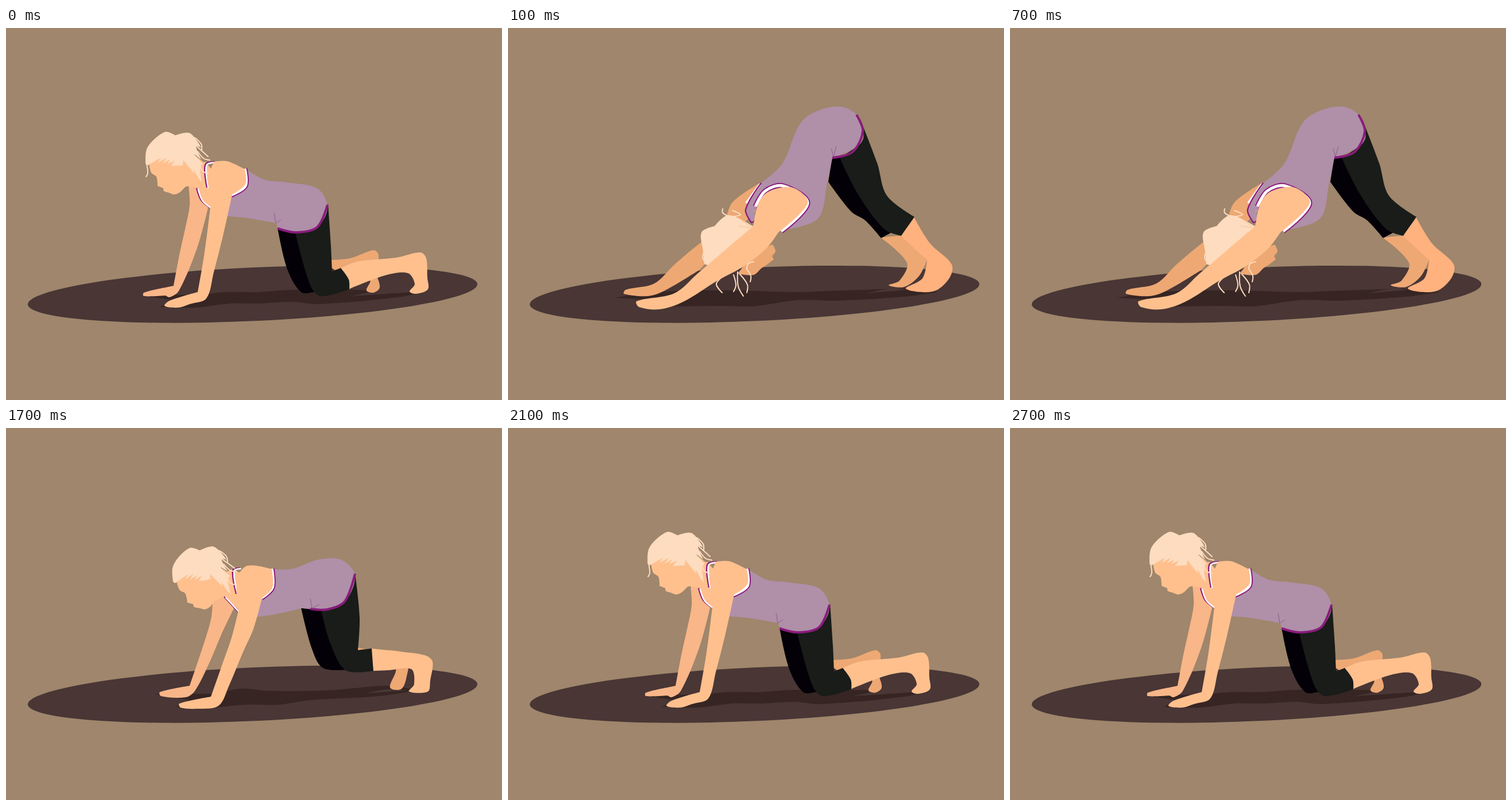
Write an HTML page that moves like this. It is 864 px wide and 648 px high and loops after 3100 ms.

```html
<!DOCTYPE html>
<html lang="en">
<head>
<meta charset="utf-8">
<title>Yoga poses</title>
<style>
  html, body { margin: 0; width: 100%; height: 100%; overflow: hidden; background: #9f866c; }
  svg { display: block; width: 100%; height: 100%; }
  .mat { fill: #493635; }
  .shadow { fill: #362523; }
  .skin { fill: #ffc08e; }
  .shade { fill: #f9b688; }
  .deep { fill: #eea873; }
  .warm { fill: #ffb17e; }
  .hair { fill: #fddcbf; }
  .top { fill: #b08fa9; }
  .near { fill: #191c18; }
  .far { fill: #040007; }
  .line { fill: none; stroke-linejoin: round; }
  .strand { stroke: #fddcbf; stroke-width: 2; stroke-linecap: round; }
  .fringe { stroke: #ffc08e; }
  .crease { stroke: #8a5b88; }
  .hem { stroke: #8a1c7c; stroke-width: 4; }
  .strap { stroke: #8a1c7c; stroke-width: 2.4; }
  .armhole { stroke: #8a1c7c; stroke-width: 9; }
  .white { stroke: #fff; }
  .armhole.white { stroke-width: 5; }
  .strap.white { transform: translate(2.5px, 1px); }

  /* Hard cuts between the poses */
  .pose { visibility: hidden; animation: 3100ms step-end infinite; }
  #kneel { animation-name: kneel; }
  #dog { animation-name: dog; }
  #lift { animation-name: lift; }
  @keyframes kneel {
    0% { visibility: visible; }
    3.2258% { visibility: hidden; }
    67.7419%, 100% { visibility: visible; }
  }
  @keyframes dog {
    0% { visibility: hidden; }
    3.2258% { visibility: visible; }
    35.4839%, 100% { visibility: hidden; }
  }
  @keyframes lift {
    0% { visibility: hidden; }
    35.4839% { visibility: visible; }
    67.7419%, 100% { visibility: hidden; }
  }
</style>
</head>
<body>
<svg viewBox="0 0 864 648">
  <defs>
    <path id="face" class="skin" data-via="248,228! 253,252 262,259 264,275! 274,279! 275,284 284,287 293,290 303,286 312,277! 334,270! 346,235! 320,215!"/>
    <g id="hair">
      <path class="hair" data-via="247,239! 243,236 247,207 277,181 295,187! 320,183 340,208! 331,206 340,229! 328,220 343,237! 338,241 341,269! 332,257 336,263! 327,247 328,254! 309,230! 308,239! 296,240! 288,240! 294,231! 281,237! 286,229! 273,236! 280,226! 264,235! 270,226!"/>
      <path class="line strand" data-via="329,191 340,202 341,212 / 331,205 341,214 352,224 / 334,215 344,227 355,230 / 337,236 342,249 352,253"/>
    </g>
  </defs>

  <ellipse class="mat" rx="392" ry="46.6" transform="translate(429.5 463.8) rotate(-2.6)"/>

  <g id="kneel" class="pose">
    <path class="shadow" data-via="242,467! 350,463! 385,460 440,460 500,456 650,457! 600,467! 708,460 736,457! 690,468 545,481 500,477 440,480 390,480 330,487 268,486! 290,474!"/>
    <path class="deep" data-via="567,404! 600,401 640,387 649,395 645,425 651,452 640,461 628,457 634,440 600,438! 567,418!"/>
    <path class="skin" data-via="578,421! 612,407 680,400 722,391 732,401 734,435 735,455 715,463 703,459 712,446 700,427 660,431 597,455!"/>
    <path class="far" data-via="473,348! 490,420 514,460 537,460 552,455! 515,353!"/>
    <path class="near" data-via="561,306! 566,380 568,424! 583,418! 597,438 598,455! 548,467 530,448 504,357! 543,345"/>
    <path class="shade" data-via="318,275! 333,277! 352,313! 333,383 301,458 285,469 278,466! 240,467 240,461 278,452! 292,449! 302,395 312,350 320,308"/>
    <path class="top" data-via="332,278! 357,314! 372,295! 417,245! 450,264 490,269 543,280 560,313 542,347 505,356 473,349! 471,340! 420,331 385,328! 393,290! 350,250!"/>
    <path class="line hem" data-via="473,349 505,356 542,347 560,308"/>
    <path class="line crease" data-via="467,322 470,340! 479,334"/>
    <use href="#face"/>
    <path class="skin" data-via="318,276! 333,278! 342,302 358,312! 370,260! 347,233! 325,240!"/>
    <path class="line strap" data-via="364,233 347,238 350,278"/>
    <path class="line strap" data-via="332,279 340,300 357,314"/>
    <path class="line armhole" data-via="416,245 417,275 392,291"/>
    <path class="skin" data-via="350,262! 362,233! 385,232 416,246! 417,272 394,290! 378,362 362,425 349,471 320,481 300,487 276,484 285,475 334,460! 346,390 356,312! 355,288!"/>
    <use href="#hair"/>
    <path class="line strand" data-via="244,232 247,252 244,259"/>
  </g>

  <g id="dog" class="pose">
    <path class="shadow" data-via="184,470! 270,459 390,457 500,460 590,457 725,454 748,460! 690,468 575,475 505,474 425,485 378,484 300,485 225,486! 245,473!"/>
    <path class="mat" data-via="625,462! 695,456! 665,454"/>
    <path class="deep" data-via="649,365! 688,361! 730,404! 716,432 690,451 663,448 682,440 695,409"/>
    <path class="warm" data-via="707,329! 735,375 773,412 768,437 740,459 693,454 722,436 730,404! 684,362!"/>
    <path class="far" data-via="565,225! 585,225! 672,354! 650,366! 622,335 598,320 558,268!"/>
    <path class="near" data-via="614,160! 643,235 660,292 708,329! 685,362! 655,350 610,290 578,226! 618,195"/>
    <path class="deep" data-via="441,269! 390,305 378,345! 338,372 290,412 255,445 205,456 202,463 243,467 272,458 334,421! 430,320!"/>
    <path class="deep" data-via="430,390! 461,377! 466,389 460,397! 463,403! 450,413 442,418 428,430 400,428!"/>
    <path class="top" data-via="441,270! 478,236 510,165 545,142 585,138 612,158 615,200 565,226! 556,270 540,332 478,352! 427,318! 434,334! 424,339 414,315!"/>
    <path class="line hem" data-via="607,151 618,180 600,216 565,226"/>
    <path class="line crease" data-via="563,210 567,224! 572,206"/>
    <path class="line white" stroke-width="4" data-via="439,272 415,305"/>
    <path class="line strap" data-via="441,270 414,316 424,339! 433,335! 434,308"/>
    <path class="line armhole" data-via="431,311 448,284 479,275 522,305 476,354"/>
    <path class="hair" data-via="429,347! 384,326 360,345! 337,356 340,390 342,411! 354,416! 400,395!"/>
    <path class="line strand" data-via="387,329 374,322 374,315 / 389,329 405,325 391,318 / 343,386 339,400 344,408 / 383,426 363,445 373,461 / 393,430 397,448 393,459 / 400,425 401,450 410,467 / 404,429 417,447 416,461 / 416,420 423,432 422,442"/>
    <path class="skin" data-via="428,342! 436,306 454,285 496,278 522,305 471,356! 450,384 409,416 365,440 305,477 264,490 228,486 224,476 290,462 330,428 385,381 424,348!"/>
    <path class="line fringe" data-via="424,348 402,345 / 422,346 406,334"/>
    <path class="line strand" data-via="428,407 418,411 416,420"/>
  </g>

  <g id="lift" class="pose">
    <path class="shadow" data-via="258,463! 365,463! 410,454 460,458 560,457 668,449 715,457! 650,467 530,474 475,482 415,482 350,488 296,486! 320,474!"/>
    <path class="mat" data-via="627,462! 699,457! 665,455"/>
    <path class="deep" data-via="612,382! 636,387 680,388 701,397 697,437 688,455 669,452 678,417 613,392!"/>
    <path class="skin" data-via="635,384! 680,389 730,396 743,407 739,440 735,459 702,459 711,446 706,420 665,422 640,423!"/>
    <path class="far" data-via="514,313! 533,385 552,418 594,421! 555,316!"/>
    <path class="near" data-via="608,253! 616,330 613,387! 637,384! 640,423! 592,422 565,375 549,317! 590,300"/>
    <path class="shade" data-via="360,299! 358,328 349,362 320,449! 268,460 270,467 313,469 329,458 356,405 375,360 397,314! 380,293!"/>
    <path class="top" data-via="379,293! 404,321! 464,246! 500,245 545,229 585,230 608,257 590,302 545,317! 515,314! 467,325 437,329! 445,295! 400,248!"/>
    <path class="line hem" data-via="530,315 560,316 590,302 608,254"/>
    <path class="line crease" data-via="530,297 533,314! 546,307"/>
    <use href="#face" transform="translate(342.5 261) rotate(-6) translate(-295 -235)"/>
    <path class="skin" data-via="361,299! 380,293! 406,317! 425,260! 394,246! 365,260!"/>
    <path class="line strap" data-via="407,244 395,248 401,289"/>
    <path class="line strap" data-via="380,294 404,320"/>
    <path class="line armhole" data-via="463,245 464,278 445,296"/>
    <path class="skin" data-via="400,262! 420,240 463,246! 464,278 446,296! 431,350 413,390 388,450 370,484 331,489 304,487 302,480 357,468! 378,408 393,365 405,318! 402,288!"/>
    <use href="#hair" transform="translate(342.5 261) rotate(-6) translate(-295 -235)"/>
  </g>
</svg>
<script>
  // Smooth curve through "x,y" points; "!" marks a corner.
  function smooth(text, closed) {
    const points = text.trim().split(/\s+/).map(token => {
      const [x, y] = token.split(',').map(parseFloat);
      return { x, y, corner: token.endsWith('!') };
    });
    const count = points.length;
    const at = i => points[(i + count) % count];
    const gap = (a, b) => Math.hypot(b.x - a.x, b.y - a.y);
    const handle = (i, length) => {
      const p = at(i), before = at(i - 1), after = at(i + 1);
      const isEnd = !closed && (i === 0 || i === count - 1);
      const k = p.corner || isEnd ? 0 : length / 3 / (gap(before, p) + gap(p, after));
      return [p.x + (after.x - before.x) * k, p.y + (after.y - before.y) * k];
    };
    let d = `M${points[0].x} ${points[0].y}`;
    for (let i = 0; i < (closed ? count : count - 1); i++) {
      const end = at(i + 1), length = gap(at(i), end);
      d += `C${handle(i, length)} ${handle((i + 1) % count, -length)} ${end.x} ${end.y}`;
    }
    return closed ? d + 'Z' : d;
  }

  for (const path of document.querySelectorAll('[data-via]')) {
    const closed = !path.classList.contains('line');
    path.setAttribute('d', path.dataset.via.split('/').map(part => smooth(part, closed)).join(''));
  }

  // White piping inside the purple trim
  for (const trim of document.querySelectorAll('.armhole, #kneel .strap, #lift .strap')) {
    const piping = trim.cloneNode();
    piping.classList.add('white');
    trim.after(piping);
  }
</script>
</body>
</html>
```
